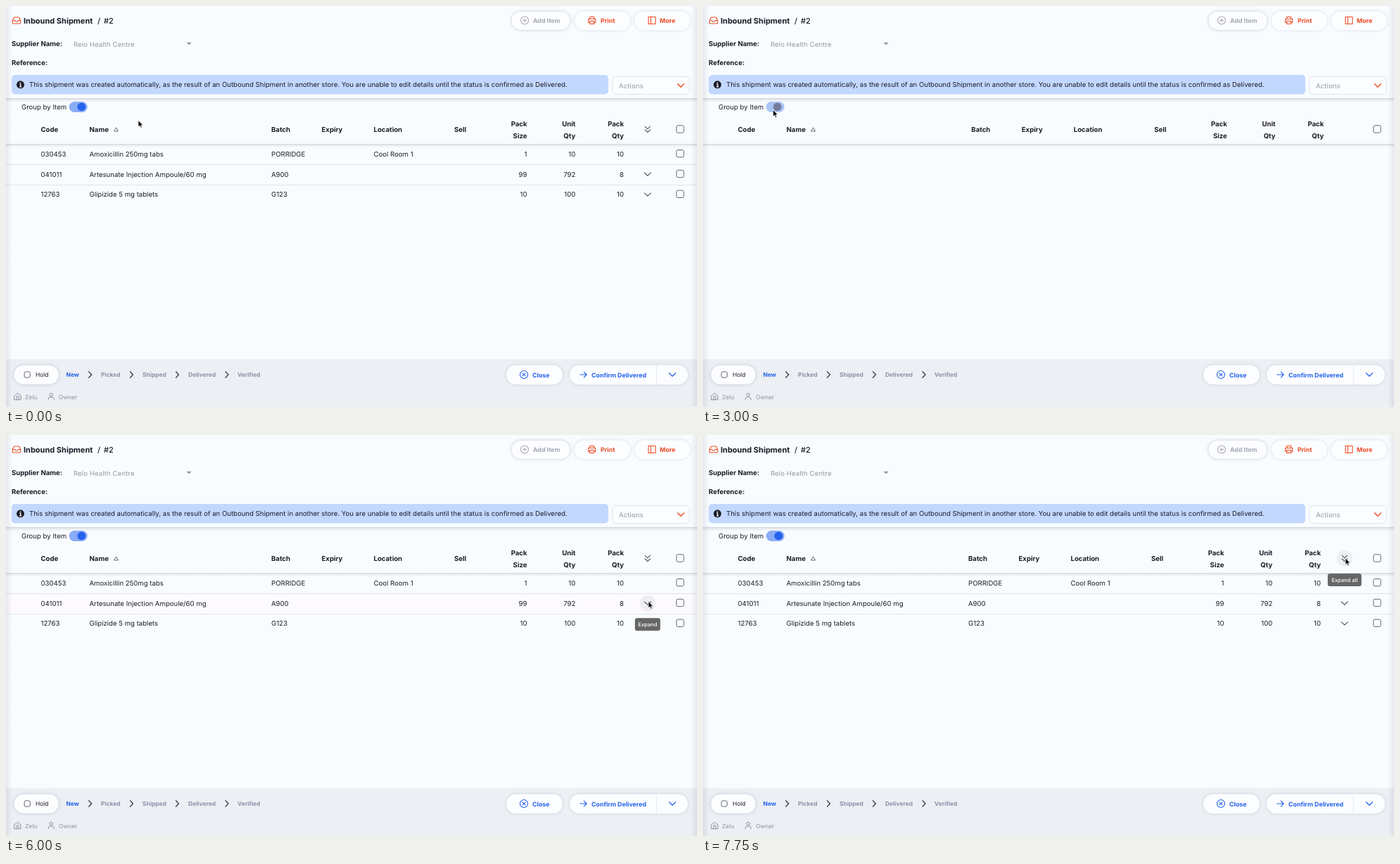
An HTML page for the animation above (8 s loop, 982 px wide and 570 px high).

```html
<!DOCTYPE html>
<html lang="en">
<head>
<meta charset="utf-8">
<title>Inbound Shipment</title>
<style>
html, body { margin: 0; width: 100%; height: 100%; overflow: hidden; background: #f9fcff; }
#stage { display: block; width: 982px; height: 570px; font-family: Inter, "Open Sans", sans-serif; text-rendering: geometricPrecision; }
.icon { fill: none; stroke-linecap: round; stroke-linejoin: round; }
.pill { fill: #fcfdff; filter: drop-shadow(0 .7px 2px rgba(70, 80, 110, .2)); }
.field { letter-spacing: .009em; }
</style>
</head>
<body>
<svg id="stage" viewBox="0 0 982 570">
  <defs>
    <linearGradient id="drop" x2="0" y2="1">
      <stop stop-color="#56606e" stop-opacity=".28"/>
      <stop offset=".3" stop-color="#56606e" stop-opacity=".12"/>
      <stop offset="1" stop-color="#56606e" stop-opacity="0"/>
    </linearGradient>
    <linearGradient id="side">
      <stop stop-color="#56606e" stop-opacity=".12"/>
      <stop offset="1" stop-color="#56606e" stop-opacity="0"/>
    </linearGradient>
  </defs>
  <rect width="982" height="570" fill="#f9fcff"/>
  <g id="frame"></g>
  <g id="table"></g>
  <g fill="url(#side)">
    <rect width="9" height="570"/>
    <rect width="9" height="570" transform="matrix(-1 0 0 1 982 0)"/>
  </g>
  <path id="cursor" d="M0 0V9.4L2.2 7.4 3.6 10.8 5.2 10.1 3.8 6.9H6.7Z" fill="#000" stroke="#fff" stroke-width=".7"/>
</svg>
<script>
const INK = '#1c1c28', GREY = '#8f90a6', PALE = '#a6a8b5', BLUE = '#2463eb', RED = '#f04a24', LINE = '#dfe3e9';
const LOOP = 8000, STEP = 250;
const $ = id => document.getElementById(id);

// Text is placed by its left, middle or right edge and the centre of its capitals.
function text(x, y, s, { size = 9.6, fill = INK, weight = 400, anchor = 'start', cls = '' } = {}) {
  return `<text class="${cls}" x="${x}" y="${y + size * .364}" font-size="${size}" font-weight="${weight}" fill="${fill}" text-anchor="${anchor}">${s}</text>`;
}
const rect = (x, y, w, h, r, attrs) => `<rect x="${x}" y="${y}" width="${w}" height="${h}" rx="${r}" ${attrs}/>`;
const circle = (x, y, r, fill) => `<circle cx="${x}" cy="${y}" r="${r}" fill="${fill}"/>`;
const icon = (x, y, d, stroke, width = 1.1, scale = 1) =>
  `<path class="icon" transform="translate(${x} ${y}) scale(${scale})" d="${d}" stroke="${stroke}" stroke-width="${width / scale}"/>`;
const pill = (x, y, w, h, attrs = '') => rect(x, y, w, h, h / 2, 'class="pill" ' + attrs);
const rule = y => rect(0, Math.floor(y), 982, 1, 0, `fill="${LINE}"`);
const check = (x, y, s = 10.4) => rect(x - s / 2, y - s / 2, s, s, 2, 'fill="none" stroke="#646773" stroke-width="1"');
const tip = (x, y, w, s) => rect(x - w / 2, y - 9, w, 18, 3, 'fill="#666"') +
  text(x, y, s, { size: 7.6, weight: 500, fill: '#fff', anchor: 'middle' });

const DOWN = 'M-4.5-2.2L0 2.2 4.5-2.2', UP = 'M-4.5 2.2L0-2.2 4.5 2.2', NEXT = 'M-2-4.2L2 0-2 4.2';
const RING = 'M5.5 0A5.5 5.5 0 1 1-5.5 0A5.5 5.5 0 1 1 5.5 0';
const TWO_DOWN = 'M-3.7-4.2L0-.6 3.7-4.2M-3.7.6L0 4.2 3.7.6';
const TWO_UP = 'M-3.7-.6L0-4.2 3.7-.6M-3.7 4.2L0 .6 3.7 4.2';
const INBOX = 'M10 0H4L2 3H-2L-4 0H-10M-6.55-6.9L-10 0V6a2 2 0 0 0 2 2H8a2 2 0 0 0 2-2V0L6.55-6.9A2 2 0 0 0 4.8-8H-4.8a2 2 0 0 0-1.75 1.1Z';
const PRINTER = 'M-3-2V-5H3V-2M-3 3H-5V-2H5V3H3M-3 1H3V5H-3Z';
const PANEL = 'M-5-5H5V5H-5ZM-1.6-5V5';
const HOME = 'M-4.6-1L0-4.7 4.6-1V4.7H-4.6ZM-1.5 4.7V0H1.5V4.7';
const PERSON = 'M-4 4.7V3.6A2.4 2.4 0 0 1-1.6 1.2H1.6A2.4 2.4 0 0 1 4 3.6V4.7M2.2-2.5A2.2 2.2 0 1 1-2.2-2.5A2.2 2.2 0 1 1 2.2-2.5';

function frameMarkup() {
  const btn = (x, s, fill) => text(x, 20.8, s, { size: 8.8, weight: 700, fill });
  const act = (x, s) => text(x, 524.3, s, { size: 8.8, weight: 700, fill: BLUE });
  const title = { size: 11, weight: 700 }, number = { size: 11, weight: 500 }, small = { size: 8.4, fill: GREY };
  const stages = [[85.5, 'New'], [135, 'Picked'], [194, 'Shipped'], [259, 'Delivered'], [329, 'Verified']];
  return icon(15, 20.5, INBOX, RED, 1.1, .57) + text(25, 20.5, 'Inbound Shipment', title) +
    text(130, 20.5, '/', number) + text(139, 20.5, '#2', number) +
    text(8, 53.3, 'Supplier Name:', { weight: 700 }) +
    text(96, 54.8, 'Relo Health Centre', { fill: '#96989f', cls: 'field' }) +
    '<path d="M256.5 51.8h7.2l-3.6 3.7z" fill="#96989f"/>' +
    text(8, 80.8, 'Reference:', { weight: 700 }) +
    pill(718, 7.5, 84, 27, 'stroke="#dfe1e8" stroke-width=".8"') +
    icon(737, 20.5, RING + 'M-2.5 0H2.5M0-2.5V2.5', PALE) + btn(749, 'Add Item', PALE) +
    pill(808, 7.5, 79, 27) + icon(832.7, 20.5, PRINTER, RED) + btn(845, 'Print', RED) +
    pill(893, 7.5, 79, 27) + icon(918, 20.5, PANEL, RED) + btn(929, 'More', RED) +
    rect(8, 98, 848, 27.5, 5, 'fill="#c3d8ff"') + circle(20.5, 111.8, 5.5, INK) +
    '<path d="M20.5 108.4v1.5M19.3 111.2h1.4v3.6M19 114.8h3.2" stroke="#fff" stroke-width="1.3" fill="none"/>' +
    text(33, 111.8, 'This shipment was created automatically, as the result of an Outbound Shipment in another store. You are unable to edit details until the status is confirmed as Delivered.') +
    rect(862, 100.5, 109, 25, 5, `fill="#fbfdff" stroke="${LINE}"`) +
    text(871, 113.2, 'Actions', { fill: '#9698a4', cls: 'field' }) + icon(959, 113, DOWN, RED, 1.4) +
    rect(0, 131, 982, 6, 0, 'fill="url(#drop)"') +
    rect(0, 502, 982, 68, 0, 'fill="#eceff4"') +
    pill(11, 510.5, 64, 27.5, 'stroke="#dfe2e9" stroke-width=".8"') + check(30.2, 524, 8.2) +
    text(42, 524.3, 'Hold', { size: 8.4 }) +
    stages.map(([x, s], i) => text(x, 524, s, { size: 8.4, weight: 700, fill: i ? GREY : BLUE })).join('') +
    [119.7, 178.5, 243.5, 314].map(x => icon(x, 524, NEXT, '#3c3e49', 1.3)).join('') +
    pill(711, 510.5, 80, 27.5) + icon(736, 524, RING + 'M-1.9-1.9L1.9 1.9M1.9-1.9L-1.9 1.9', BLUE) + act(748, 'Close') +
    pill(801, 510.5, 168, 27.5) + icon(820.5, 524, 'M-4.6 0H4.6M.8-3.8L4.6 0 .8 3.8', BLUE, 1.2) +
    act(832, 'Confirm Delivered') + rect(924, 510.5, 1, 27.5, 0, 'fill="#e8ebf1"') + icon(947, 524, DOWN, BLUE, 1.3) +
    icon(16.5, 555, HOME, GREY, 1) + text(27, 556.2, 'Zelu', small) +
    icon(64.2, 555, PERSON, GREY, 1) + text(75, 556.2, 'Owner', small);
}

const AMOX = ['030453', 'Amoxicillin 250mg tabs', 'PORRIDGE', 'Cool Room 1', 1, 10, 10];
const ART = ['041011', 'Artesunate Injection Ampoule/60 mg', 'A900', ''];
const GLIP = ['12763', 'Glipizide 5 mg tablets', 'G123', ''];
const GROUPED = [AMOX, [...ART, 99, 792, 8], [...GLIP, 10, 100, 10]];
const art = [...ART, 99, 396, 4], glip = [...GLIP, 10, 50, 5];
const SINGLE = [AMOX, art, art, glip, glip];

function toggle(on) {
  if (on === 1) return rect(89.7, 136, 26, 15, 7.5, 'fill="#8aabf6"') + circle(107.3, 143.4, 5.9, BLUE);
  if (on === 0) return rect(90, 136.3, 25.4, 14.4, 7.2, 'fill="#fcfdff" stroke="#dcdde6" stroke-width=".8"') + circle(96.4, 143.4, 5.9, '#85869f');
  return rect(89.7, 136, 26, 15, 7.5, 'fill="#a9c3f6"') + circle(96.2 + 10.5 * on, 143.4, 5.9, '#777c9c');
}

function details(open) {
  const cell = { size: 8.3 }, end = { ...cell, anchor: 'end' };
  const head = { ...cell, weight: 700 }, headEnd = { ...head, anchor: 'end' };
  const line = y => text(76, y, 'A900', cell) + text(224, y, '09/2029', cell) +
    text(629.5, y, 4, end) + text(815, y, 99, end) + text(904, y, '$0.00', end);
  return `<svg y="253" width="982" height="${87 * open}"><g transform="translate(0 -253)">` +
    rect(67, 253.5, 846, 86, 8, 'fill="#f2f0f4" stroke="#e9e7ec" stroke-width=".8"') +
    '<path d="M67.5 281.5V262a8 8 0 0 1 8-8H904.5a8 8 0 0 1 8 8V281.5Z" fill="#fdfbff"/>' +
    text(79, 267.8, 'Batch', head) + text(227, 267.8, 'Expiry', head) + text(376, 267.8, 'Location', head) +
    text(627, 267.8, 'Pack Qty', headEnd) + text(812.5, 267.8, 'Pack Size', headEnd) + text(882.5, 267.8, 'Cost', head) +
    line(296) + line(324.8) + '</g></svg>';
}

function tableMarkup({ grouped, loading, on, open, hover, label }) {
  const dx = grouped ? 0 : 4.3, bold = { weight: 700 }, end = { anchor: 'end' }, boldEnd = { ...bold, ...end };
  const nums = [740.5, 809.3, 878].map(x => x + dx);
  const rows = loading ? [] : grouped ? GROUPED : SINGLE;
  let out = '';
  if (hover === 'row') out += rect(0, 226, 982, 28 + 90 * open, 0, 'fill="#fdfaff"');
  out += rect(0, 196, 982, 5, 0, 'fill="url(#drop)"') +
    text(22, 143.6, 'Group by Item') + toggle(on) +
    text(49.5, 175.8, 'Code', bold) + text(118.5, 175.8, 'Name', bold) +
    icon(156.8, 175.8, 'M-2.8 2.2H2.8L0-2.6Z', '#55565f', .9) +
    [[377, 'Batch'], [448.5, 'Expiry'], [522.5, 'Location'], [637, 'Sell']].map(([x, s]) => text(x + dx, 175.8, s, bold)).join('') +
    ['Pack Size', 'Unit Qty', 'Pack Qty'].map((s, i) => s.split(' ').map((w, k) => text(nums[i], 167.6 + 16.5 * k, w, boldEnd)).join('')).join('') +
    check(958, 175);
  if (hover === 'head') out += circle(911.8, 175.6, 11.3, '#eceef1');
  if (grouped) out += icon(911.8, 175.4, open ? TWO_UP : TWO_DOWN, '#50525c');

  rows.forEach(([code, name, batch, place, ...qty], i) => {
    const y = 210.4 + 28.8 * i + (i > 1 ? 90 * open : 0);
    if (i) out += rule(y - 13.9);
    out += text(49.5, y, code) + text(118.5, y, name) + text(377 + dx, y, batch) + text(522.5 + dx, y, place) +
      qty.map((n, k) => text(nums[k], y, n, end)).join('') + check(958, y - .7);
    if (grouped && i) {
      if (i === 1 && hover === 'row') out += circle(911.8, y, 11.3, '#efedf1');
      out += icon(911.8, y, open && i === 1 ? UP : DOWN, '#50525c');
    }
  });
  if (open) out += details(open);
  if (label) out += hover === 'head' ? tip(911.8, 206, 48, label) : tip(911.8, 269.2, label.length > 6 ? 42 : 36, label);
  return out;
}

const between = (t, a, b) => t >= a && t < b;
function stateAt(t) {
  return {
    grouped: !between(t, 3000, 4500),
    loading: t === 3000 || t === 4500,
    on: t === 3000 ? .9 : t === 4500 ? .5 : between(t, 3000, 4500) ? 0 : 1,
    open: t === 6250 || t === 7000 ? .5 : between(t, 6500, 7000) ? 1 : 0,
    hover: t >= 7750 ? 'head' : t >= 5750 ? 'row' : '',
    label: t >= 7750 ? 'Expand all' : between(t, 6500, 7250) ? 'Collapse' : t >= 6000 ? 'Expand' : ''
  };
}

// Pointer stops: time, x, y.
const PATH = [
  [0, 188, 162.5], [1000, 197, 140.8], [1500, 197, 140.8], [2500, 99.6, 147.7], [4500, 99.6, 147.7],
  [5000, 621, 351.8], [5750, 913, 236.5], [7500, 913, 236.5], [7750, 913, 175]
];
function pointerAt(t) {
  const i = Math.max(1, PATH.findIndex(p => p[0] >= t));
  const [t0, x0, y0] = PATH[i - 1], [t1, x1, y1] = PATH[i];
  const u = (t - t0) / (t1 - t0), k = u * u * (3 - 2 * u);
  return [x0 + (x1 - x0) * k, y0 + (y1 - y0) * k];
}

// The picture advances four times a second.
let shown = -1;
function draw(now) {
  const t = Math.floor(now % LOOP / STEP) * STEP;
  if (t !== shown) {
    shown = t;
    $('table').innerHTML = tableMarkup(stateAt(t));
    $('cursor').setAttribute('transform', `translate(${pointerAt(t)})`);
  }
}
const start = performance.now();
function tick() {
  draw(performance.now() - start);
  requestAnimationFrame(tick);
}
$('frame').innerHTML = frameMarkup();
tick();
</script>
</body>
</html>
```
